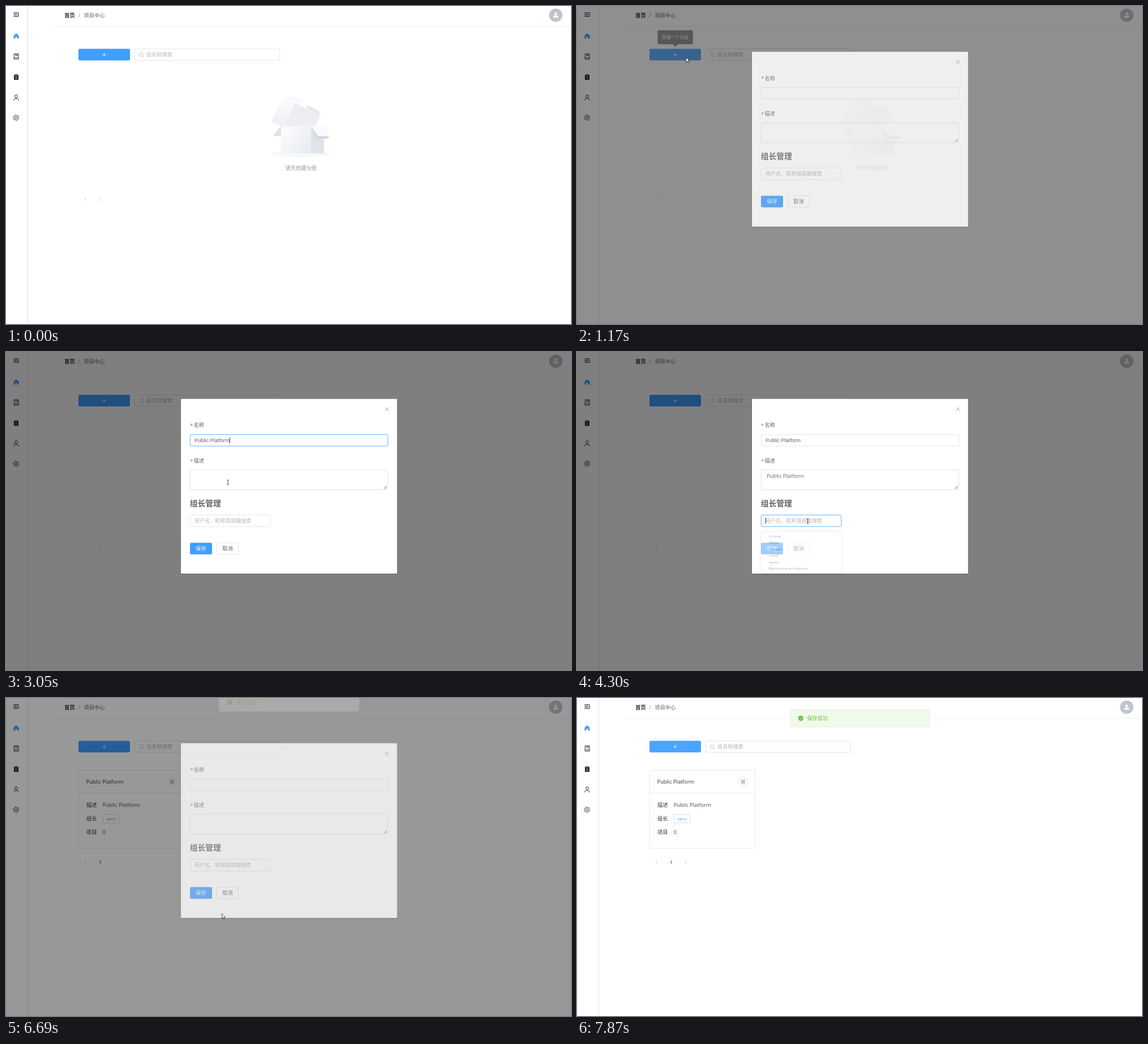
These frames come from a looping animation (998x561 px, 7940 ms). An HTML page with a canvas:

```html
<!DOCTYPE html>
<html lang="zh-CN">
<head>
<meta charset="utf-8">
<title>项目中心</title>
<style>
html, body { margin: 0; width: 100%; height: 100%; overflow: hidden; background: #fff; }
canvas { display: block; width: 998px; height: 561px; }
</style>
</head>
<body>
<canvas id="stage"></canvas>
<script>
const W = 998, H = 561, LOOP = 7940, STEP = 66.5;
const UI = '"Open Sans", "Noto Sans CJK SC", "Noto Sans CJK", sans-serif';
const ARIAL = '"Liberation Sans", "Noto Sans CJK SC", sans-serif';
const BLUE = '#409eff', HOVER = '#66b1ff', INK = '#303133', BODY = '#606266',
      HINT = '#b4b7bd', LINE = '#dcdfe6', GREEN = '#67c23a';
const TITLE = 'Public Platform', LEADER = 'sero';
const USERS = ['mina', 'dale', 'owen', 'ned', LEADER, 'Belnovira Admin'];
const OPEN = 996, LIST_OPEN = 4257, PICK = 5260, SAVED = 6644;

const dpr = window.devicePixelRatio || 1;
function surface(canvas) {
  canvas.width = W * dpr;
  canvas.height = H * dpr;
  const c = canvas.getContext('2d');
  c.scale(dpr, dpr);
  return c;
}
const layers = [surface(document.getElementById('stage')),
  surface(document.createElement('canvas')), surface(document.createElement('canvas'))];
let depth = 0, g = layers[0];

// ---- timing ----
const clamp = v => Math.max(0, Math.min(1, v));
const smooth = p => p * p * (3 - 2 * p);
function bezier(x1, y1, x2, y2) {
  const at = (a, b, s) => 3 * (1 - s) ** 2 * s * a + 3 * (1 - s) * s * s * b + s ** 3;
  return p => {
    if (p <= 0 || p >= 1) return clamp(p);
    let lo = 0, hi = 1;
    for (let i = 0; i < 24; i++) {
      const m = (lo + hi) / 2;
      if (at(x1, x2, m) < p) lo = m; else hi = m;
    }
    return at(y1, y2, lo);
  };
}
const ease = bezier(.25, .1, .25, 1), zoom = bezier(.23, 1, .32, 1);
const run = (t, start, span = 300, f = ease) => f(clamp((t - start) / span));
const during = (t, a, b) => t >= a && t < b;
const typed = (t, a, b) => TITLE.slice(0, Math.round(clamp((t - a) / (b - a)) * TITLE.length));

// ---- drawing helpers ----
function group(alpha, draw) {
  if (alpha <= 0) return;
  if (alpha >= 1) return draw();
  const below = g;
  g = layers[++depth];
  g.clearRect(0, 0, W, H);
  draw();
  const canvas = g.canvas;
  g = below;
  depth--;
  g.save();
  g.globalAlpha = alpha;
  g.drawImage(canvas, 0, 0, W, H);
  g.restore();
}
function moved(x, y, draw, sx = 1, sy = 1) {
  g.save();
  g.translate(x, y);
  g.scale(sx, sy);
  draw();
  g.restore();
}
function paint(fill, stroke, lw = .8) {
  if (fill) { g.fillStyle = fill; g.fill(); }
  if (stroke) { g.strokeStyle = stroke; g.lineWidth = lw; g.stroke(); }
}
function box(x, y, w, h, r, fill, stroke, lw) {
  g.beginPath();
  g.roundRect(x, y, w, h, r);
  paint(fill, stroke, lw);
}
function disc(x, y, r, fill, stroke, lw) {
  g.beginPath();
  g.arc(x, y, r, 0, Math.PI * 2);
  paint(fill, stroke, lw);
}
function path(d, fill, stroke, lw) {
  const p = new Path2D(d);
  if (fill) { g.fillStyle = fill; g.fill(p); }
  if (stroke) { g.strokeStyle = stroke; g.lineWidth = lw || 1; g.stroke(p); }
}
function text(s, x, cy, color, size = 9.2, weight = 400, font = UI, align = 'left') {
  g.font = `${weight} ${size}px ${font}`;
  g.textAlign = align;
  g.fillStyle = color;
  g.fillText(s, x, cy + size * .37);
  return g.measureText(s).width;
}
function fade(x1, y1, x2, y2, a, b) {
  const f = g.createLinearGradient(x1, y1, x2, y2);
  f.addColorStop(0, a);
  f.addColorStop(1, b);
  return f;
}

// ---- page ----
function sidebar() {
  g.fillStyle = '#dfe1e6';
  g.fillRect(38, 0, 1, H);
  path('M13.3 12.2h9.4M13.3 15.2h6M13.3 18.2h9.4', null, '#222', 1.3);
  path('M22.8 13.4v3.6l-2.4-1.8z', '#222');
  path('M18 48.3l4.6 3.9v5.4h-3v-3.2h-3.2v3.2h-3v-5.4z', BLUE);
  path('M14.2 84.3h7.8v9.6h-7.8zM14.2 91.4h7.8M17 84.5v3.7l1.5-1.1 1.5 1.1v-3.7', null, INK, 1);
  box(14, 121.3, 8, 9, .6, '#222');
  box(16, 120.2, 4, 2.2, .4, '#222', '#fff', .5);
  path('M16 125h4M16 127.5h4', null, '#fff', .7);
  disc(18, 159.2, 2.5, null, INK, 1);
  path('M13.8 166.6v-.7a2.6 2.6 0 0 1 2.6-2.6h3.2a2.6 2.6 0 0 1 2.6 2.6v.7', null, INK, 1);
  moved(17.8, 197, () => {
    g.beginPath();
    for (let i = 0; i < 24; i++) {
      const a = (i + .5) / 24 * Math.PI * 2, r = i % 4 < 2 ? 5 : 3.9;
      g.lineTo(Math.cos(a) * r, Math.sin(a) * r);
    }
    g.closePath();
    paint(null, INK, 1);
    disc(0, 0, 1.9, null, INK, .9);
  });
}
function header() {
  g.fillStyle = '#e8eaee';
  g.fillRect(84, 35.6, W - 84, .8);
  text('首页', 103.3, 16.5, INK, 9.2, 700);
  text('/', 127.6, 16.5, '#8d9096', 9.2);
  text('项目中心', 137.6, 16.5, BODY);
  disc(971, 16.2, 11.8, '#c0c4cc');
  disc(971, 13.9, 2.4, '#fff');
  path('M966.4 20.6q.2-3.8 3.2-3.8h2.8q3 0 3.2 3.8z', '#fff');
}
function toolbar(color) {
  box(128, 75.5, 91, 20.6, 2.4, color);
  path('M170 86h7M173.5 82.5v7', null, '#fff', .8);
  box(227.4, 75.7, 256.2, 20.2, 2.4, '#fff', LINE);
  disc(239, 85.7, 3.4, null, HINT, .8);
  path('M241.5 88.2l1.8 1.8', null, HINT, .8);
  text('组名称搜索', 248, 85.8, HINT);
}
function pager(y, page) {
  const chevron = (x, d) => path(`M${x - d} ${y - 2.6}l${2 * d} 2.6l${-2 * d} 2.6`, null, '#b4b7bd', .8);
  chevron(140.3, -1.1);
  chevron(page ? 192 : 167.6, 1.1);
  if (page) text('1', 166.3, y, BLUE, 9.2, 700, UI, 'center');
}
function emptyBox() {
  const k = 1.329;
  moved(468.5, 152.3, () => {
    path('M39.5 86C61.3 86 79 83.9 79 81.3S57.3 78 35.5 78 0 78.8 0 81.3 17.7 86 39.5 86z', '#f7f8fa');
    path('M13 45h40L42 58H2z', '#e0e2e7');
    g.save();
    g.translate(34.5, 31.5);
    g.scale(-1, 1);
    g.rotate(-25 * Math.PI / 180);
    g.translate(-27.5, -21.5);
    path('M0 7h18l5-4H5z', '#e5e7e9');
    path('M0 7h38v36H0z', '#edeef2');
    path('M38 7h17v36H38z', fade(48, 7, 45, 43, '#fcfcfd', '#eeeff3'));
    path('M55 7H38L24 0h17z', '#f8f9fb');
    g.restore();
    path('M13 45h40v36H13z', fade(13, 48, 53, 78, '#fcfcfd', '#e9ebef'));
    path('M53 45h17v36H53z', '#e0e3e9');
    path('M53 45h17l6.5 13-.5 3.3-16 1z', '#d5d7de');
    path('M70 45H53l9 13h17z', '#f8f9fb');
  }, k, k);
  text('请先创建分组', 521, 286, '#909399', 9.2, 400, UI, 'center');
}
function card() {
  box(128.2, 127.4, 186.2, 137.8, 2.4, '#fff', '#e2e5ea');
  g.fillStyle = '#e2e5ea';
  g.fillRect(128.2, 167, 186.2, .8);
  text(TITLE, 141.6, 147.8, INK, 9.25);
  disc(293.2, 147.5, 7.6, '#fff', LINE);
  path('M293.6 144.9h-3v5.4h5.4v-3M292.4 148.5l.3-1.4 3-3 1.1 1.1-3 3z', null, BODY, .7);
  text('描述', 142, 189, INK);
  text(TITLE, 170.8, 188.8, '#45474b', 9.25);
  text('组长', 142, 212.5, INK);
  box(171.2, 205.4, 28.8, 15, 2, '#fff', '#b3d8ff');
  text(LEADER, 185.6, 212.8, BLUE, 7.9, 400, UI, 'center');
  text('项目', 142, 236.8, INK);
  text('0', 170.8, 236.8, '#45474b');
}
function tooltip() {
  box(142.4, 42.8, 62.4, 24.6, 2.6, INK);
  path('M168.8 67h9.6l-4.8 5.4z', INK);
  text('创建一个分组', 173.6, 55.4, '#fff', 7.85, 400, UI, 'center');
}

// ---- dialog ----
function caret(x, y) {
  g.fillStyle = '#111';
  g.fillRect(x, y - 5, .9, 10);
}
function field(x, y, w, h, focused) {
  box(x + .2, y, w - .4, h, 2.4, '#fff', focused ? BLUE : LINE);
}
function saveColor(t) {
  if (t >= SAVED || t < 5740) return BLUE;
  return during(t, 6190, 6310) ? '#3a8ee6' : HOVER;
}
function dialog(t) {
  const done = t >= SAVED, tag = t >= PICK + 40 && !done, dy = tag ? 22 : 0;
  const focus = during(t, 1640, 3040) ? 'name' : during(t, 3040, 3930) ? 'about'
    : during(t, 3930, PICK) ? 'user' : '';
  const name = done ? '' : typed(t, 2080, 2640), about = done ? '' : typed(t, 3080, 3500);
  g.save();
  g.shadowColor = 'rgba(0,0,0,.3)';
  g.shadowBlur = 2;
  g.shadowOffsetY = .7;
  box(309, 82.7, 381.8, 308.3 + dy, 1.3, '#fff');
  g.restore();
  path('M669.7 97.9l6 6M675.7 97.9l-6 6', null, '#909399', .9);

  text('*', 325.3, 129.8, '#77797d');
  text('名称', 331.6, 129, BODY);
  field(325, 145.7, 349.8, 20.3, focus === 'name');
  const nw = text(name, 333, 155.9, BODY, 9.2, 400, ARIAL);
  if (focus === 'name') caret(333 + nw, 156);

  text('*', 325.3, 192.3, '#77797d');
  text('描述', 331.6, 191.5, BODY);
  field(325, 208.1, 349.8, 34.8, focus === 'about');
  path('M667.6 241.3l4.8-4.8M670.4 241.3l2-2', null, '#444', .8);
  const aw = text(about, 335.3, 219, BODY, 9.25);
  if (focus === 'about') caret(335.3 + aw, 219);

  text('组长管理', 324.8, 267, BODY, 13.75, 700);
  field(325, 287.6, 142, 20.3, focus === 'user');
  text('用户名、昵称或邮箱搜索', 332.8, 297.7, HINT, 9.15);
  if (focus === 'user') caret(332.8, 297.7);

  if (tag) {
    box(325.2, 323.3, 43, 20.4, 2.4, '#ecf5ff', '#d9ecff');
    text(LEADER, 333, 334, BLUE, 7.9);
    path('M357 331.9l4 4M361 331.9l-4 4', null, BLUE, .8);
  }
  box(325, 336.5 + dy, 39, 20.6, 2.4, saveColor(t));
  text('保存', 344.5, 346.8 + dy, '#fff', 9.2, 400, UI, 'center');
  box(372.2, 336.8 + dy, 38.4, 20, 2.4, '#fff', LINE);
  text('取消', 391.4, 346.8 + dy, BODY, 9.2, 400, UI, 'center');
}
function modal(t) {
  const a = run(t, OPEN) - run(t, SAVED), d = Math.max(0, a) ** 1.15;
  group(a, () => {
    g.fillStyle = 'rgba(0,0,0,.5)';
    g.fillRect(0, 0, W, H);
    group(d, () => moved(0, -13 * (1 - d), () => dialog(t)));
  });
}
function userList(t) {
  const k = run(t, LIST_OPEN, 300, zoom) - run(t, PICK, 300, zoom);
  group(k, () => moved(0, 317, () => {
    g.save();
    g.shadowColor = 'rgba(0,0,0,.12)';
    g.shadowBlur = 8;
    box(325.2, 0, 142, 146, 2.4, '#fff', '#e4e7ed');
    g.restore();
    const at = pointer(t), hot = Math.floor((at.y - 317 - 4.5) / 22.8);
    USERS.forEach((user, i) => {
      if (i === hot && at.y > 321) {
        g.fillStyle = '#f5f7fa';
        g.fillRect(325.6, 4.5 + i * 22.8, 141.2, 22.8);
      }
      text(user, 338.4, 16 + i * 22.8, BODY);
    });
  }, 1, k));
}
function message(t) {
  if (t < SAVED) return;
  const drop = run(t, SAVED, 400);
  group(run(t, SAVED), () => moved(0, -32 * (1 - drop), () => {
    box(376.3, 20.3, 247.4, 31.4, 2.6, '#f0f9eb', '#e9f6e2');
    disc(395.2, 35.8, 4.6, GREEN);
    path('M393 35.9l1.6 1.6 2.9-3', null, '#fff', .9);
    text('保存成功', 406.4, 35.8, GREEN);
  }));
}

// ---- pointer: time, x, y, shape from then on ----
const TRACK = [
  [240, 1000, 420, 'arrow'], [640, 200, 95, 'hand'], [860, 190, 89.5, 'hand'],
  [990, 190, 89.5, 'arrow'], [1150, 190, 89.5, 'arrow'], [1450, 380, 156, 'beam'],
  [1600, 389, 160.5, 'beam'], [1900, 389, 160.5, 'beam'], [2040, 407, 192, 'arrow'],
  [2380, 240, 137, 'arrow'], [2650, 262, 147, 'arrow'], [2980, 392, 230, 'beam'],
  [3570, 392, 230, 'beam'], [3770, 407.5, 298.5, 'beam'], [4320, 407.5, 298.5, 'beam'],
  [4450, 390, 330, 'hand'], [4900, 352, 424, 'hand'], [5290, 352, 424, 'hand'],
  [5800, 345.5, 368.8, 'hand'], [6550, 345.5, 368.8, 'arrow'], [6690, 381.3, 380.5, 'arrow'],
  [7440, 998, 525, 'arrow']
];
function pointer(t) {
  const i = TRACK.findIndex(k => k[0] > t);
  if (i < 1) return { x: W + 20, y: 0, shape: '' };
  const a = TRACK[i - 1], b = TRACK[i], p = smooth((t - a[0]) / (b[0] - a[0]));
  return { x: a[1] + (b[1] - a[1]) * p, y: a[2] + (b[2] - a[2]) * p, shape: a[3] };
}
const SHAPES = {
  arrow: () => path('M0 0v8.6l2-1.8 1.4 3.1 1.4-.6-1.4-3h2.7z', '#fff', '#222', .8),
  beam: () => path('M-1.8-4h1.4L0-3.6.4-4h1.4M0-3.6v7.2M-1.8 4h1.4L0 3.6.4 4h1.4', null, '#222', .8),
  hand: () => path('M-.8.9q.8-1.3 1.6 0v3.2q1-.6 1.5.3 1-.5 1.5.4 1-.3 1.1.7v2.6l-.9 2.8h-4.5l-2.8-4.2q.3-1.1 1.4-.4l1.1 1z',
    '#fff', '#222', .8)
};

function render(t) {
  const saved = t >= SAVED;
  let button = BLUE;
  if (during(t, 600, 1350) || during(t, SAVED + 300, 7870)) button = HOVER;
  if (t >= 7860) button = '#4ba4ff';
  g.fillStyle = '#fff';
  g.fillRect(0, 0, W, H);
  sidebar();
  header();
  toolbar(button);
  if (saved) card(); else emptyBox();
  pager(saved ? 290 : 341.5, saved);
  group(run(t, 700, 150) - run(t, 1110, 200), tooltip);
  modal(t);
  userList(t);
  message(t);
  const at = pointer(t);
  if (at.shape) moved(at.x, at.y, SHAPES[at.shape]);
}

function tick(now) {
  const t = now % LOOP;
  render(t < 240 ? 0 : t >= 7870 ? 7870 : 240 + Math.floor((t - 232) / STEP) * STEP);
  requestAnimationFrame(tick);
}
const start = performance.now();
requestAnimationFrame(function first() {
  const loop = () => { tickAt(); requestAnimationFrame(loop); };
  const tickAt = () => {
    const t = (performance.now() - start) % LOOP;
    render(t < 240 ? 0 : t >= 7870 ? 7870 : 240 + Math.floor((t - 232) / STEP) * STEP);
  };
  loop();
});
</script>
</body>
</html>
```
